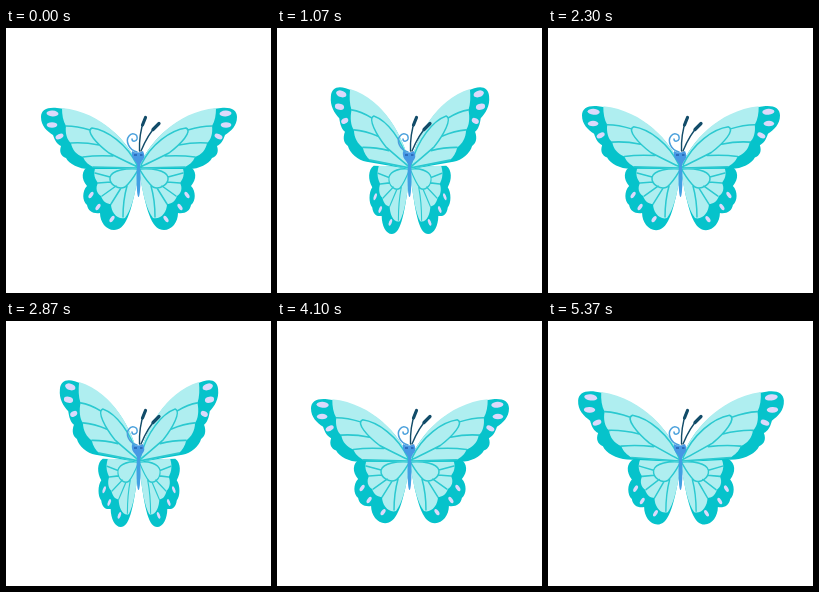
An HTML page that plays this animation: 265 px wide and 265 px high, repeating every 5.4 s.

```html
<!DOCTYPE html>
<html lang="en">
<head>
<meta charset="utf-8">
<title>Butterfly</title>
<style>
  html, body { margin: 0; width: 100%; height: 100%; overflow: hidden; background: #fff; }
  svg { display: block; width: 100vw; height: 100vh; }
  .edge { fill: #06c3cb; }
  .pane { fill: #afeef0; }
  .vein { fill: none; stroke: #2bc9d0; stroke-width: 1.5; stroke-linecap: round; stroke-linejoin: round; }
  .spot { fill: #dcd9fb; }
  .line { fill: none; stroke-linecap: round; }
</style>
</head>
<body>
<svg viewBox="0 0 265 265">
  <defs>
    <!-- Wings start at the root and spread to the right -->
    <g id="hind">
      <path class="edge" d="M0-1L50-2C58 2 58 11 52 18C57 23 57 33 52 37C51 43 46 46 39 45C39 54 33 62 25 62C14 62 8 48 1 8Z"/>
      <path class="pane" d="M0-1L43-2C47 7 43 12 41 15C44 20 42 26 38 28C36 34 32 36 28 36C28 44 22 52 14 50C8 42 4 28 1 8Z"/>
      <path class="vein" d="M1 1C12 0 27 2 29 9C30 17 20 22 14 19C8 14 4 7 1 2M29 9L44 5M28 14L41 15M23 18L37 28M18 20L28 36M12 18Q16 32 16 49"/>
      <g class="spot">
        <ellipse rx="1.800" ry="3.600" transform="translate(48 27) rotate(-35)"/>
        <ellipse rx="1.800" ry="3.600" transform="translate(41 39) rotate(-35)"/>
        <ellipse rx="1.800" ry="3.600" transform="translate(27 51) rotate(-35)"/>
      </g>
    </g>
    <g id="fore">
      <path class="edge" d="M2-5C10-24 36-56 82-60C92-61 98-58 98-51C98-42 92-37 86-33C84-27 82-24 78-22C80-16 78-12 73-10C70-4 60 1 50 1L0 1Z"/>
      <path class="pane" d="M2-5C10-24 36-56 77-60C77-53 76-47 73-42C74-35 72-28 68-25C67-18 62-13 56-11C54-6 50-3 46-1L0 1Z"/>
      <path class="vein" d="M2-3C12-24 32-38 47-40C54-37 42-24 30-15C18-9 8-4 1-1M49-38Q62-42 73-42M40-23Q55-26 68-25M26-12Q42-13 56-11M1 0L46-1"/>
      <g class="spot">
        <ellipse rx="6" ry="2.900" transform="translate(86.500 -54.500) rotate(-4)"/>
        <ellipse rx="5.300" ry="2.700" transform="translate(87 -43)"/>
        <ellipse rx="4.200" ry="2.400" transform="translate(79.500 -31.500) rotate(25)"/>
      </g>
    </g>
    <g id="wing">
      <use class="hind" href="#hind"/>
      <use class="fore" href="#fore"/>
    </g>
  </defs>

  <g transform="translate(133 140)">
    <g class="wing" transform="scale(-1 1)"></g>
    <g class="wing"></g>
  </g>

  <ellipse cx="132.500" cy="150" rx="2" ry="19" fill="#429fe3"/>
  <path d="M126 123Q131 126 137 123Q140 129 136 133L133 139L129 133Q125 129 126 123Z" fill="#4798e4"/>
  <path d="M128 127h3M134 127h2.500" stroke="#245fae" stroke-width="1.600"/>
  <path class="line" d="M131 124C123 122 119 113 123 108C126 104 132 106 131 111C130 114 126 114 126 111" stroke="#4aa0dc" stroke-width="1.500"/>
  <g class="line" stroke="#124c69">
    <path d="M133.500 123Q133 106 138 92M135 123Q142 106 151 97" stroke-width="1.400"/>
    <path d="M136.500 97L139.500 89.500M147 101.500L153 95.500" stroke-width="3.200"/>
  </g>
</svg>

<script>
  const LOOP = 5400, FRAMES = 162, BEATS = 33;
  const TOP = .9, RISE = .37, HOLD = .41;   // lift at the top, and shares of one beat

  const wings = document.querySelectorAll('.wing');
  for (const wing of wings)
    for (const part of document.getElementById('wing').children) wing.append(part.cloneNode());

  // Wings swing up with growing speed, pause, then drop fast and slow down.
  function liftAt(beat) {
    if (beat < RISE) return TOP * (beat / RISE) ** 2;
    if (beat < HOLD) return TOP;
    return TOP * (1 - ((beat - HOLD) / (1 - HOLD)) ** .75);
  }

  function draw(time) {
    const frame = Math.floor(time % LOOP * FRAMES / LOOP + .15);
    const lift = liftAt(frame * BEATS / FRAMES % 1);
    const turn = -.2 * lift * 180 / Math.PI;
    const width = 1 + .635 * lift - 1.284 * lift ** 2;
    const height = 1 + .17 * Math.sqrt(lift);
    const hindWidth = 1 - .1 * lift - .5 * lift ** 2;
    const hindHeight = 1 + .1 * lift;
    for (const wing of wings) {
      wing.querySelector('.fore').setAttribute('transform', `scale(${width} ${height}) rotate(${turn})`);
      wing.querySelector('.hind').setAttribute('transform', `scale(${hindWidth} ${hindHeight})`);
    }
  }

  const start = performance.now();
  function tick() {
    draw(performance.now() - start);
    requestAnimationFrame(tick);
  }
  tick();
</script>
</body>
</html>
```
